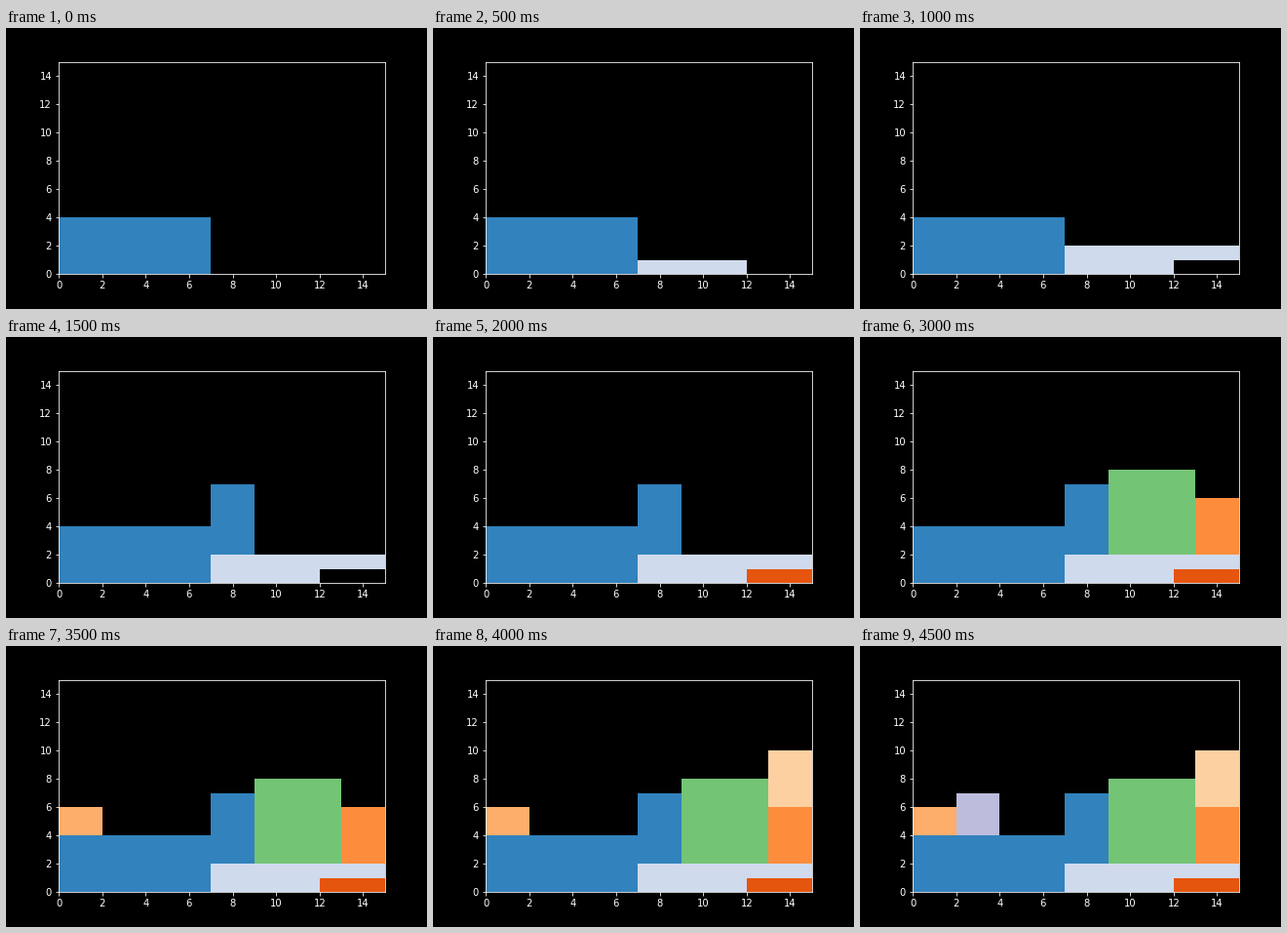
A matplotlib script that plays this animation: 432 by 288 pixels, repeating every 5 s.

```python
import matplotlib.pyplot as plt
from matplotlib.animation import FuncAnimation
from matplotlib.patches import Rectangle

plt.style.use("dark_background")
plt.rcParams.update({"font.family": "DejaVu Sans", "font.size": 10})

SIZE = 15
STEP_MS = 500

BLUE, PALE = "#3182bd", "#d0daed"

# x, y, width, height, colour, in packing order
BLOCKS = [
    (0, 0, 7, 4, BLUE),
    (7, 0, 5, 1, PALE),
    (7, 1, 8, 1, PALE),
    (7, 2, 2, 5, BLUE),
    (12, 0, 3, 1, "#e6550d"),
    (9, 2, 4, 6, "#74c476"),
    (13, 2, 2, 4, "#fd8d3c"),
    (0, 4, 2, 2, "#fdae6b"),
    (13, 6, 2, 4, "#fdd0a2"),
    (2, 4, 2, 3, "#bcbddc"),
]

fig, ax = plt.subplots(figsize=(6, 4), dpi=72)
fig.subplots_adjust(left=0.125, right=0.9, bottom=0.125, top=0.88)
ax.set(xlim=(0, SIZE), ylim=(0, SIZE),
       xticks=range(0, SIZE, 2), yticks=range(0, SIZE, 2))

patches = [
    ax.add_patch(Rectangle((x, y), w, h, facecolor=color, linewidth=0))
    for x, y, w, h, color in BLOCKS
]


def draw(frame):
    for i, patch in enumerate(patches):
        patch.set_visible(i <= frame)
    return patches


def reset():
    return draw(0)


anim = FuncAnimation(fig, draw, frames=len(BLOCKS), init_func=reset,
                     interval=STEP_MS, repeat=True, repeat_delay=0)
plt.show()
```
